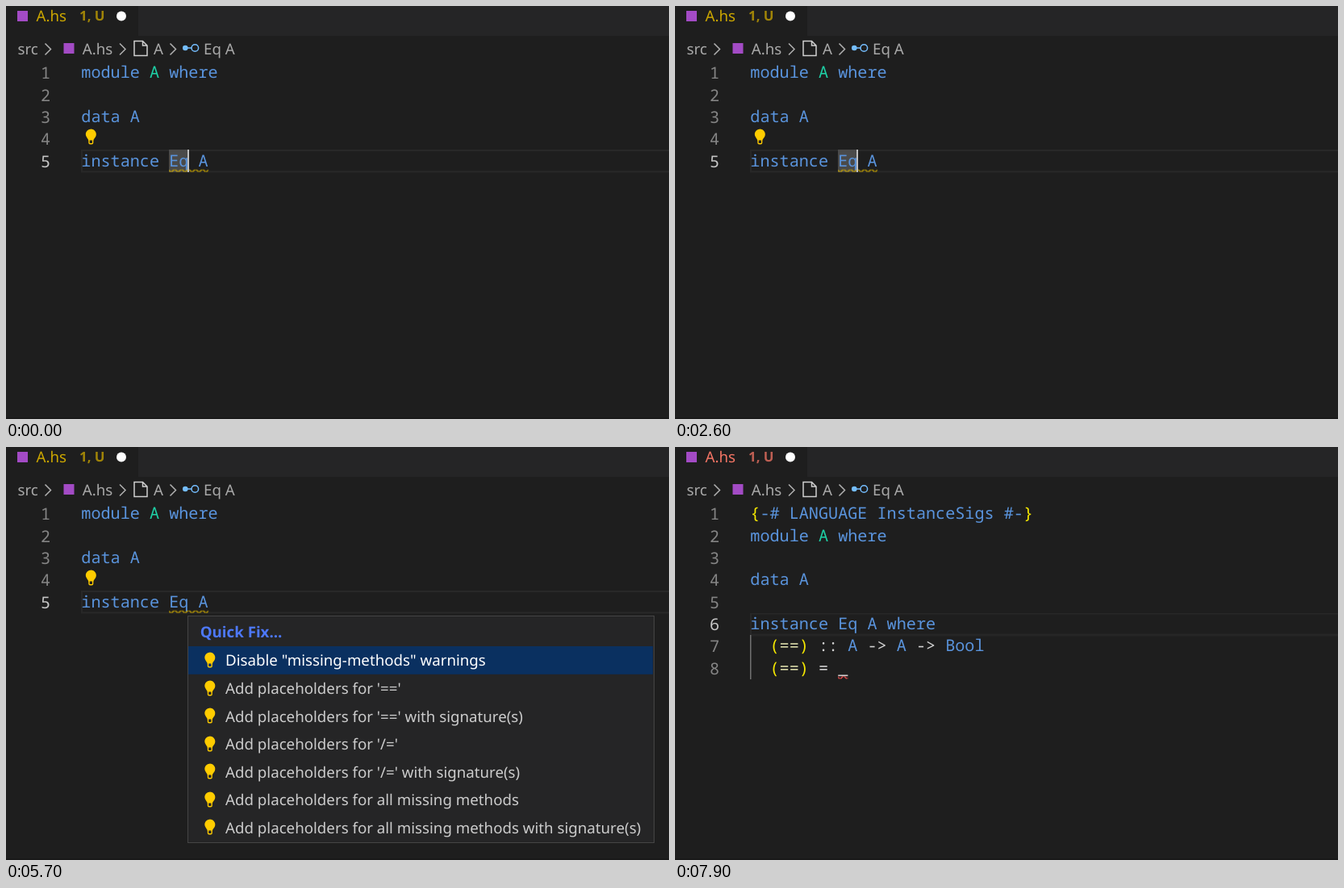
Write an HTML page that moves like this. It is 822 px wide and 512 px high and loops after 8000 ms.

```html
<!DOCTYPE html>
<html lang="en">
<head>
<meta charset="utf-8">
<title>Quick fix in a code editor</title>
<style>
html, body { margin: 0; width: 100%; height: 100%; overflow: hidden; background: #1e1e1e; }
svg { display: block; }
text { font: 18.72px "Noto Sans", sans-serif; fill: #a9a9a9; white-space: pre; text-rendering: geometricPrecision; }
.code, .num { font: 20.16px "Noto Sans Mono", monospace; }
.code { fill: #5a94dd; }
.num { fill: #858585; text-anchor: end; }
.now { fill: #c6c6c6; }
.type { fill: #1ecfa5; }
.paren { fill: #f5e800; }
.fn { fill: #dcdcaa; }
.op { fill: #d4d4d4; }
.item { fill: #ccc; }
.title { font-weight: 700; fill: #4d78fb; }
.badge { font-size: 16.85px; font-weight: 600; opacity: .75; }
.lens { font-size: 17.28px; fill: #999; }
.icon { fill: none; stroke: #b0b0b0; stroke-width: 1.5; }
.bulb { fill: #fc0; fill-rule: evenodd; }

/* One loop is 8 s, so 1.25% is 100 ms. */
.anim { animation: 8s step-end infinite; }
.before { animation-name: before; }
.after { animation-name: after; }
.word { animation-name: word; }
.hint { animation-name: hint; }
.warn { animation-name: warn; }
.stub { animation-name: stub; }
.drop { animation-name: drop; }
.error { animation-name: error; }
.sign { animation-name: sign; }
.tab { animation-name: tab; }
.caret { animation-name: caret, down; }
.row { animation-name: down; }
.menu { animation-name: menu; }
.bar { animation-name: bar; }
.pick0 { animation-name: pick0; }
.pick1 { animation-name: pick1; }
.pick2 { animation-name: pick2; }

@keyframes before { 0% { opacity: 1 } 93.75% { opacity: 0 } }
@keyframes after { 0% { opacity: 0 } 93.75% { opacity: 1 } }
@keyframes word { 0% { opacity: 1 } 33.75% { opacity: 0 } }
@keyframes hint { 0%, 60% { opacity: 1 } 33.75%, 93.75% { opacity: 0 } }
@keyframes warn { 0%, 58.75% { opacity: 1 } 33.75%, 93.75% { opacity: 0 } }
@keyframes stub { 0%, 56.25% { opacity: 0 } 33.75% { opacity: 1 } }
@keyframes drop { 0%, 56.25% { transform: none } 41.25% { transform: translateY(23px) } }
@keyframes error { 0%, 56.25% { opacity: 0 } 40% { opacity: 1 } }
@keyframes sign { 0%, 56.25% { opacity: 0 } 41.25% { opacity: 1 } }
@keyframes tab { 0%, 61.25% { fill: #cca700 } 36.25%, 93.75% { fill: #f47565 } }
@keyframes caret {
  0%, 32.5%, 46.25%, 56.25%, 92.5% { opacity: 1 }
  2.5%, 40%, 52.5%, 65%, 98.75% { opacity: 0 }
}
@keyframes down { 0% { transform: none } 93.75% { transform: translateY(27.5px) } }
@keyframes menu { 0%, 32.5%, 92.5% { opacity: 0 } 8.75%, 71.25% { opacity: 1 } }
@keyframes bar {
  0%, 71.25% { transform: none }
  22.5%, 78.75% { transform: translateY(34.8px) }
  80% { transform: translateY(69.6px) }
}
@keyframes pick0 { 0%, 71.25% { fill: #fff } 22.5%, 78.75% { fill: #ccc } }
@keyframes pick1 { 0%, 32.5%, 80% { fill: #ccc } 22.5%, 78.75% { fill: #fff } }
@keyframes pick2 { 0% { fill: #ccc } 80% { fill: #fff } }
</style>
</head>
<body>
<svg id="stage" width="822" height="512" viewBox="0 0 822 512"></svg>
<script>
const LEFT = 93.3, CHAR = 12.096, TOP = 69.2, LINE = 27.36, ITEM = 34.56;
const lineTop = n => TOP + (n - 1) * LINE;
const colX = col => LEFT + col * CHAR;

const rect = (x, y, w, h, fill, cls = '') =>
  `<rect x="${x}" y="${y}" width="${w}" height="${h}" fill="${fill}" class="${cls}"/>`;
const text = (x, y, cls, str) => `<text x="${x}" y="${y}" class="${cls}">${str}</text>`;
const group = (cls, ...parts) => `<g class="anim ${cls}">${parts.join('')}</g>`;
const span = (cls, str) => `<tspan class="${cls}">${str}</tspan>`;

const code = (n, col, str) => text(colX(col), Math.round(lineTop(n) + 20), 'code', str);
const num = (n, cls = '') => text(55, Math.round(lineTop(n) + 21), 'num ' + cls, n);
const gutter = (count, active) =>
  Array.from({ length: count }, (_, i) => num(i + 1, i + 1 === active ? 'now' : '')).join('');

const bulb = (x, y) => `<path class="bulb" transform="translate(${x} ${y})" d="M-6.5-2.9
  a6.5 6.5 0 1 1 11.1 4.6q-1.6 1.6-1.6 3.5v2.3a1.9 1.9 0 0 1-1.9 1.9h-2.2a1.9 1.9 0 0 1-1.9-1.9
  v-2.3q0-1.9-1.6-3.5a6.5 6.5 0 0 1-1.9-4.6zM-1.6 4.6v3.3h3.2v-3.3z"/>`;
const chevron = x => `<path class="icon" d="M${x} 46.5l7 7-7 7"/>`;

// A wavy underline is a strip filled with a repeating 6 x 3 tile.
const waveTile = (id, color) => `<pattern id="${id}" width="6" height="3" patternUnits="userSpaceOnUse">
  <path fill="${color}" d="M5.5 0l-3 3H1.1l3-3zM4 0l2 2V.6L5.4 0zM0 2l1 1h1.4L0 .6z"/></pattern>`;
const wave = (id, x, y, w) =>
  `<g transform="translate(${x} ${y}) scale(1.44)">${rect(0, 0, w / 1.44, 3, `url(#${id})`)}</g>`;

const moduleLine = `module ${span('type', 'A')} where`;
const eqName = span('paren', '(') + span('fn', '==') + span('paren', ')');
const hole = `${eqName} ${span('op', '= _')}`;
const arrow = span('op', '-&gt;');

const chrome = [
  rect(0, 0, 822, 37, '#252526'),
  rect(0, 0, 164, 37, '#1e1e1e'),
  rect(0, 510, 822, 2, '#191919'),
  rect(14, 6, 13, 13, '#a34bc5'),
  text(37.5, 19, 'anim tab', 'A.hs'),
  text(91, 18, 'badge anim tab', '1, U'),
  '<circle cx="143" cy="12.5" r="6" fill="#fff"/>',
  text(14.5, 60, '', 'src'),
  chevron(48.5),
  rect(71.5, 46, 13, 13, '#a34bc5'),
  text(94.8, 60, '', 'A.hs'),
  chevron(141),
  '<path class="icon" style="stroke:#d0d0d0" d="M160 43.5h9.5l5.5 5.5v12.5h-16v-18zm9.5 0v5.5h5.5"/>',
  text(183, 60, '', 'A'),
  chevron(203.5),
  `<g fill="none" stroke="#75beff" stroke-width="1.5"><path d="M222 52h8"/>
   <circle cx="234.3" cy="52" r="4.3"/></g><circle cx="222.3" cy="52" r="3.3" fill="#75beff"/>`,
  text(245, 60, '', 'Eq A'),
];

const editor = [
  `<rect class="anim row" x="94" y="179" width="740" height="26.4" fill="none" stroke="#282828" stroke-width="2"/>`,
  rect(202, 178, 25, 28, '#4a4a4a', 'anim word'),
  group('before', gutter(5, 5), code(1, 0, moduleLine), code(3, 0, 'data A'), code(5, 0, 'instance Eq A')),
  group('hint', bulb(105.3, 162)),
  group('warn', wave('yellow', 202.2, 201.8, 48.6)),
  group('stub',
    code(5, 14, 'where'),
    group('drop',
      num(6),
      code(6, 2, hole),
      rect(93, 206, 1.5, 27, '#707070'),
      group('error', wave('red', 202.2, 228.8, 12.1)))),
  group('sign', text(117.3, 223, 'lens', '(==) :: A -&gt; A -&gt; Bool')),
  group('after',
    gutter(8, 6),
    code(1, 0, `${span('paren', '{')}-# LANGUAGE InstanceSigs #-${span('paren', '}')}`),
    code(2, 0, moduleLine),
    code(4, 0, 'data A'),
    code(6, 0, 'instance Eq A where'),
    code(7, 2, `${eqName} ${span('op', '::')} A ${arrow} A ${arrow} Bool`),
    code(8, 2, hole),
    rect(93, 233, 1.5, 55, '#707070'),
    wave('red', 202.2, 283.5, 12.1)),
  rect(225, 178, 2, 28, '#c0c0c0', 'anim caret'),
];

const add = 'Add placeholders for ';
const items = [
  'Disable "missing-methods" warnings',
  add + "'=='",
  add + "'==' with signature(s)",
  add + "'/='",
  add + "'/=' with signature(s)",
  add + 'all missing methods',
  add + 'all missing methods with signature(s)',
];
const menu = group('menu',
  '<rect x="225.5" y="209.5" width="578" height="281" fill="#252526" stroke="#454545"/>',
  rect(226, 247, 576, 34.8, '#0a3060', 'anim bar'),
  text(240.7, 236, 'title', 'Quick Fix...'),
  ...items.map((label, i) =>
    bulb(252.8, Math.round(264 + i * ITEM)) +
    text(272, Math.round(271.4 + i * ITEM), `item anim pick${i}`, label)));

document.getElementById('stage').innerHTML =
  `<defs>${waveTile('yellow', '#cca700')}${waveTile('red', '#f14c4c')}</defs>` +
  chrome.join('') + editor.join('') + menu;
</script>
</body>
</html>
```
